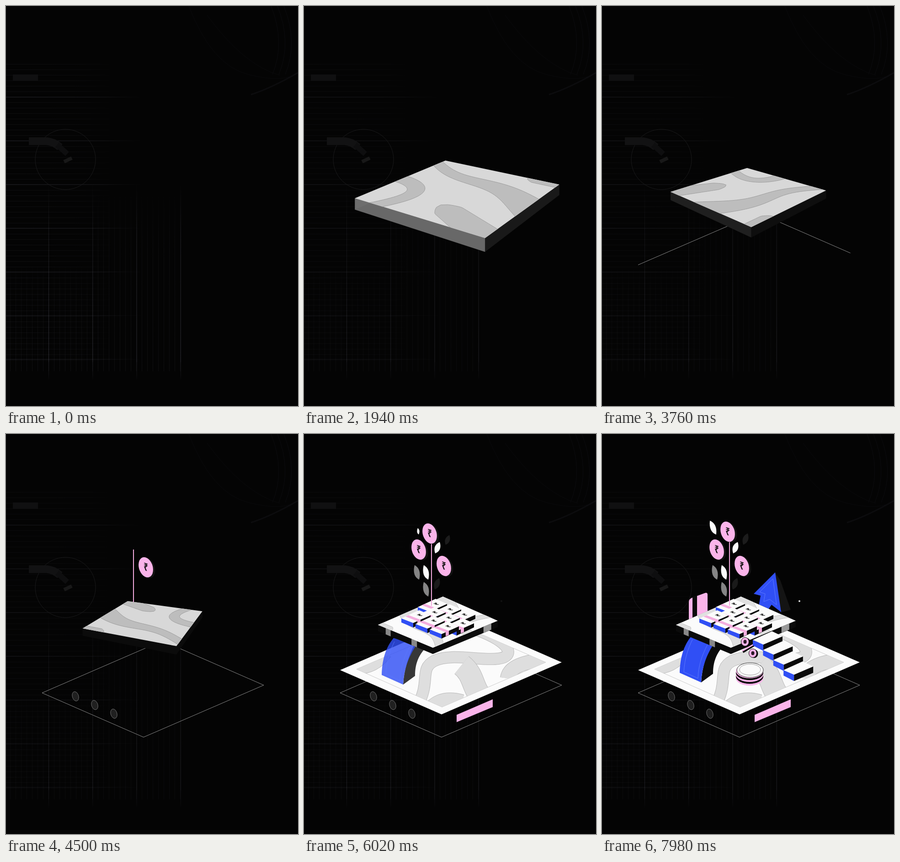
Animation of 639x876 px, one loop 8000 ms. Source, as an HTML page with a canvas:

```html
<!DOCTYPE html>
<html lang="en">
<head>
<meta charset="utf-8">
<title>Isometric savings garden</title>
<style>
html, body { margin: 0; width: 100%; height: 100%; overflow: hidden; background: #040404; }
canvas { display: block; width: 639px; height: 876px; }
</style>
</head>
<body>
<canvas id="stage" width="639" height="876"></canvas>
<script>
const g = document.getElementById('stage').getContext('2d');
const LOOP = 8000, PINK = '#fbb4ea', BLUE = '#304ff5', INK = '#0b0b0b', WHITE = '#fbfbfb';

const clamp = v => Math.max(0, Math.min(1, v));
const ramp = (t, start, length) => clamp((t - start) / length);
const easeOut = p => 1 - (1 - p) ** 3;
const smooth = p => p * p * (3 - 2 * p);
const mix = (a, b, p) => a + (b - a) * p;
const gray = v => `rgb(${v},${v},${v})`;

// Monotone cubic through [time, value] pairs
function track(t, keys) {
  const n = keys.length - 1;
  if (t <= keys[0][0]) return keys[0][1];
  if (t >= keys[n][0]) return keys[n][1];
  const rate = i => (keys[i + 1][1] - keys[i][1]) / (keys[i + 1][0] - keys[i][0]);
  const slope = i => {
    if (i === 0 || i === n) return 0;
    const a = rate(i - 1), b = rate(i);
    return a * b > 0 ? 2 * a * b / (a + b) : 0;
  };
  const i = keys.findIndex(k => k[0] > t) - 1;
  const [t0, v0] = keys[i], [t1, v1] = keys[i + 1];
  const h = t1 - t0, p = (t - t0) / h;
  return mix(v0, v1, smooth(p)) + h * p * (1 - p) * (slope(i) * (1 - p) - slope(i + 1) * p);
}

function trace(pts) {
  g.beginPath();
  pts.forEach(p => g.lineTo(p[0], p[1]));
  g.closePath();
}
function paint(fill, stroke, width = 1) {
  if (fill) { g.fillStyle = fill; g.fill(); }
  if (stroke) { g.strokeStyle = stroke; g.lineWidth = width; g.stroke(); }
}
function poly(fill, ...pts) {
  trace(pts);
  paint(fill);
}
function shape(d, fill, stroke, width = 1) {
  const path = new Path2D(d);
  if (fill) { g.fillStyle = fill; g.fill(path); }
  if (stroke) { g.strokeStyle = stroke; g.lineWidth = width; g.stroke(path); }
}
function oval(x, y, rx, ry, fill, stroke) {
  g.beginPath();
  g.ellipse(x, y, rx, ry, 0, 0, 7);
  paint(fill, stroke);
}
function layer(alpha, dx, dy, draw) {
  if (alpha <= 0) return;
  g.save();
  g.globalAlpha *= alpha;
  g.translate(dx, dy);
  draw();
  g.restore();
}

function fadeLine(x0, y0, x1, y1, level) {
  const f = g.createLinearGradient(x0, y0, x1, y1);
  f.addColorStop(0, `rgba(120,120,140,${level})`);
  f.addColorStop(.7, `rgba(120,120,140,${level * .7})`);
  f.addColorStop(1, 'rgba(120,120,140,0)');
  g.beginPath();
  g.moveTo(x0, y0);
  g.lineTo(x1, y1);
  paint(null, f);
}

function background(t) {
  g.fillStyle = '#040404';
  g.fillRect(0, 0, 639, 876);
  const glow = 1 + .5 * (1 - ramp(t, 20, 1000));
  for (let y = 127.5; y < 780; y += 12) fadeLine(0, y, 240, y, .06 * glow);
  for (let x = 9.5; x < 383; x += 12) fadeLine(x, 800, x, x < 200 ? 560 : 400, .06 * glow);
  for (let i = 0; i < 7; i++) fadeLine(0, 199.5 + i * 95.7, 300, 199.5 + i * 95.7, .14 * glow);
  for (let i = 0; i < 4; i++) {
    const x = 93.5 + i * 96.3;
    fadeLine(x, 780, x, 385, .18 * glow);
    fadeLine(x, 780, x, 820, .12 * glow);
  }
  oval(130, 336, 66, 66, null, '#1a1a1b');
  g.fillStyle = '#101011';
  g.fillRect(15, 150, 55, 14);
  shape('M50 296H88Q104 297 118 309', null, '#121213', 17);
  shape('M112 304L134 324', null, '#0e0e0f', 12);
  shape('M127 341L144 333', null, '#181818', 8);
  for (const w of [0, 14, 28])
    shape(`M${580 + w} 0Q${612 + w} 80 ${583 + w} 150`, null, '#0c0c0f');
  shape('M400 0Q450 130 530 150T639 145M440 20Q520 130 600 152', null, '#0a0a0c');
  shape('M536 194Q580 180 639 146', null, '#0c0c0e', 3);
}

// Outline of a band around a curve c(s) with half width w(s)
function ribbon(c, w) {
  const left = [], right = [], N = 32;
  for (let i = 0; i <= N; i++) {
    const s = i / N, [x, y] = c(s), [nx, ny] = c(s + .01);
    const k = w(s) / Math.hypot(nx - x, ny - y);
    left.push([x + (ny - y) * k, y - (nx - x) * k]);
    right.unshift([x - (ny - y) * k, y + (nx - x) * k]);
  }
  return left.concat(right);
}
const roundCap = s => Math.sqrt(Math.min(1, 6 * s));

// Rivers on the slab, in its own unit square
const RIVERS = [
  ribbon(s => [1.2 * s - .1, .06 + .456 * s + .05 * Math.sin(7.6 * s - .6)], s => .05 + .1 * s * s),
  ribbon(s => [.31 * Math.sin(2.4 * s) - .05, .54 + .52 * s * s], s => .07 - .02 * s),
  ribbon(s => [.53 + .55 * s, .77 + .26 * s], s => .09 * roundCap(s) + .03 * s),
  ribbon(s => [.75 + .4 * s, -.01], s => .08 * roundCap(s))
];

function slab(t) {
  const r = track(t, [[300, 233], [1940, 227], [2960, 202], [4500, 140], [5440, 113]]);
  const turn = track(t, [[300, -20], [1940, -10.5], [2960, 11.5], [4500, 158.5], [5440, 180]]) * Math.PI / 180;
  const cx = 253 + .4 * r;
  const settle = smooth(ramp(t, 5440, 500));
  const lit = 1 - ramp(t, 2960, 1000);
  const sin = Math.sin(turn), cos = Math.cos(turn);
  // Perspective spin, coming to rest as a flat isometric tile
  const place = ([a, b]) => {
    const x = a - b, z = a + b - 1;
    const depth = x * sin + z * cos, w = 1 / (1 - .215 * depth);
    return [
      mix(cx + r * w * (x * cos - z * sin), 282 - 120 * a + 142 * b, settle),
      mix(405.5 + .363 * r * w * depth, 468 - 50 * a - 59 * b - 3 * a * b, settle),
      r * .105 * mix(w, 1.15, settle)
    ];
  };
  const wall = (fill, p, q) => poly(fill, p, q, [q[0], q[1] + q[2]], [p[0], p[1] + p[2]]);
  const top = [[0, 0], [1, 0], [1, 1], [0, 1]].map(place);
  layer(ramp(t, 300, 700), 0, 0, () => {
    top.forEach((p, i) => {
      const q = top[(i + 1) % 4];
      const side = Math.min(.42, Math.max(0, (cx - (p[0] + q[0]) / 2) / r));
      wall(gray(Math.round(11 + 14 * lit + 200 * side * lit)), p, q);
    });
    layer(settle, 0, 0, () => {
      wall('#888', place([.86, 0]), place([.77, 0]));
      wall('#888', place([.39, 0]), place([.29, 0]));
      wall('#999', place([0, .78]), place([0, .9]));
    });
    const tone = Math.round(mix(216, 251, settle));
    trace(top);
    paint(gray(tone));
    g.clip();
    for (const river of RIVERS) {
      trace(river.map(place));
      paint(gray(tone - 27), gray(tone - 60));
    }
  });
}

function outline(t) {
  const p = smooth(ramp(t, 3300, 950));
  if (!p) return;
  g.save();
  trace([[79, 567], [342, 453], [564, 550], [301, 664]]);
  g.setLineDash([1060 * p, 1100]);
  paint(null, '#8b8b8b');
  g.restore();
  for (let i = 0; i < 3; i++)
    layer(ramp(t, 3900 + i * 130, 250), 152 + 42 * i, 574.5 + 19 * i, () => {
      g.transform(.72, .25, 0, 1, 0, 0);
      oval(0, 0, 10, 10, '#202020', '#777');
    });
  const x = mix(482, 334, smooth(ramp(t, 5000, 920)));
  layer(ramp(t, 5000, 200), x, 615 - (x - 334) * .435, () =>
    poly(PINK, [0, 0], [79, -34], [79, -17], [0, 16]));
}

function base(t) {
  const p = easeOut(ramp(t, 5550, 500));
  layer(p, 0, 50 * (1 - p), () => {
    poly(WHITE, [79, 517], [342, 403], [564, 500], [301, 614]);
    trace([[115, 515], [341, 418], [529, 500], [302, 598]]);
    paint(null, '#ccc');
    g.clip();
    const fill = '#dedede', edge = '#b9b9b9';
    const river = (d, width) => {
      shape(d, null, edge, width + 2);
      shape(d, null, fill, width);
    };
    river('M100 512Q150 520 180 480', 24);
    river('M245 600C280 545 250 515 285 497S385 497 425 492S450 455 380 430', 24);
    river('M395 585C365 555 375 530 345 506', 48);
    river('M530 495Q450 500 445 535', 30);
    river('M270 620Q290 575 345 590', 38);
  });
}

function arch(t) {
  const p = easeOut(ramp(t, 5850, 400));
  layer(p, 0, 25 * (1 - p), () => {
    shape('M217 544C219 510 228 485 242 455L264 466C247 485 243 505 243 525Z', INK);
    shape('M170 523C171 490 178 464 196 442L246 457C228 485 219 510 217 544Z', BLUE);
    shape('M179 521C181 492 188 470 198 450M210 535C211 508 218 486 231 461M179 521L210 535', null, '#5b78ff');
  });
}

function coinStack(t) {
  const p = easeOut(ramp(t, 6050, 400));
  layer(p, 0, -40 * (1 - p), () => {
    for (let i = 0; i < 5; i++) oval(323, 535 - i * 4, 30, 16, i % 2 ? INK : PINK);
    oval(324, 517, 29, 16, WHITE, '#333');
    oval(324, 516, 23, 12, null, '#999');
  });
}

// Grows upward from a ground line
function rise(p, ground, draw) {
  layer(p > 0 ? 1 : 0, 0, ground * (1 - p), () => {
    g.scale(1, p);
    draw();
  });
}

function backdrop(t) {
  rise(easeOut(ramp(t, 7100, 600)), 390, () => {
    poly('#141414', [379, 304], [390, 320], [413, 385], [390, 391]);
    poly(BLUE, [379, 303], [332, 350], [347, 354], [343, 377], [364, 384], [371, 374], [392, 390]);
    shape('M374 317L345 346L357 350L354 367L367 362L382 374Z', null, '#5b78ff');
  });
  rise(easeOut(ramp(t, 6950, 500)), 408, () => {
    shape('M190 410V368Q190 362 196 359L226 348Q231 347 231 352V394Z', PINK);
    poly(INK, [198, 358], [208, 354], [208, 402], [198, 407]);
  });
}

function percent(t) {
  layer(ramp(t, 6350, 250), 0, track(t, [[6350, 16], [6700, 11], [7500, 0]]), () => {
    for (const [x, y] of [[313, 455], [330, 480]]) {
      oval(x + 3, y + 1, 8.5, 9.5, INK);
      oval(x, y, 8.5, 9.5, PINK, INK);
      oval(x, y, 3.5, 4.2, '#2a1826');
    }
    shape('M308 477L336 460', null, INK, 6);
    shape('M307 475L335 459', null, PINK, 3);
  });
}

function stairs(t) {
  for (let i = 0; i < 4; i++) {
    const p = easeOut(ramp(t, 6250 + i * 230, 350)), k = i - .4 * (1 - p);
    layer(Math.min(1, p * 2), 22.4 * k, 22 * k, () => {
      poly(BLUE, [330, 451], [353, 461], [353, 475], [330, 463]);
      poly(INK, [353, 461], [395, 443], [395, 457], [353, 475]);
      poly(WHITE, [330, 451], [372, 432], [395, 443], [353, 461]);
    });
  }
}

function rupee(size) {
  g.font = `700 ${size}px "Noto Sans", "DejaVu Sans", sans-serif`;
  g.textAlign = 'center';
  g.textBaseline = 'middle';
  g.fillStyle = '#111';
  g.fillText('₹', 0, 1);
}

function bundle(x, y, p) {
  layer(Math.min(1, p * 2), x, y - 40 * (1 - easeOut(p)), () => {
    poly(BLUE, [0, 0], [26, 10], [26, 20], [0, 9]);
    poly(INK, [26, 10], [64, -7], [64, 2], [26, 20]);
    poly(WHITE, [0, 0], [39, -18], [64, -7], [26, 10]);
    poly('#f4aedf', [9, -4], [16, -7], [42, 3], [42, 12], [35, 15], [35, 6]);
    g.transform(.85, -.38, .7, .3, 41, -7);
    rupee(16);
  });
}

// Three rows laid like bricks; the outer back bundles land last
function bundles(t) {
  for (let row = 0; row < 3; row++)
    for (let col = 0; col < 3; col++) {
      const brick = row % 2, late = !row !== !col;
      const start = late ? 5500 + 80 * (row + col) : 5190 - 40 * (row + col);
      bundle(249 + 31 * col - 18 * row + 15 * brick, 379 + 12 * col + 12.5 * row + 6 * brick, ramp(t, start, 450));
    }
}

function coin(x, y, t, start) {
  const p = easeOut(ramp(t, start, 350));
  layer(p, x, y + 10 * (1 - easeOut(ramp(t, start, 1200))), () => {
    g.transform(.74 * p, .25 * p, 0, p, 0, 0);
    oval(6, 0, 21.5, 21.5, '#131313');
    oval(0, 0, 21.5, 21.5, PINK);
    rupee(23);
  });
}

const STEM = 279;
const LEAVES = [
  [246, 205, WHITE], [292, 249, WHITE], [314, 230, '#1c1c1c'], [247, 303, '#858585'],
  [267, 303, WHITE], [267, 340, '#858585'], [291, 328, '#1a1a1a']
];

function plant(t) {
  if (t > 4000) {
    const tip = track(t, [[4000, 368], [4500, 253], [4900, 235]]);
    const foot = track(t, [[4500, 368], [5400, 376]]);
    shape(`M${STEM} ${foot}V${tip}`, null, '#f2a9dd', 2);
  }
  LEAVES.forEach(([x, y, color], i) => {
    const p = smooth(ramp(t, Math.max(4400, 5300 - 20 * (y - 205)), 1600));
    const sway = i ? 0 : track(t, [[6400, 4], [7900, -3]]);
    const right = x > STEM;
    layer(p > 0 ? 1 : 0, x + sway, y + 14 * (1 - p), () => {
      g.rotate(sway * .04);
      g.scale(right ? -p : p, right ? p * .78 : p);
      shape('M-5 -16C5 -10 9 0 5 16C-5 11 -9 0 -5 -16Z', color);
    });
  });
  coin(306, 289, t, 4100);
  coin(251, 253, t, 4950);
  coin(275, 214, t, 5700);
}

function frame() {
  const t = performance.now() % LOOP;
  const scene = [background, outline, base, arch, coinStack, backdrop, slab, percent, stairs, bundles, plant];
  scene.forEach(draw => draw(t));
  layer(ramp(t, 6000, 300), 0, 0, () => oval(432, 366, 2, 2, '#ddd'));
  requestAnimationFrame(frame);
}
frame();
</script>
</body>
</html>
```
